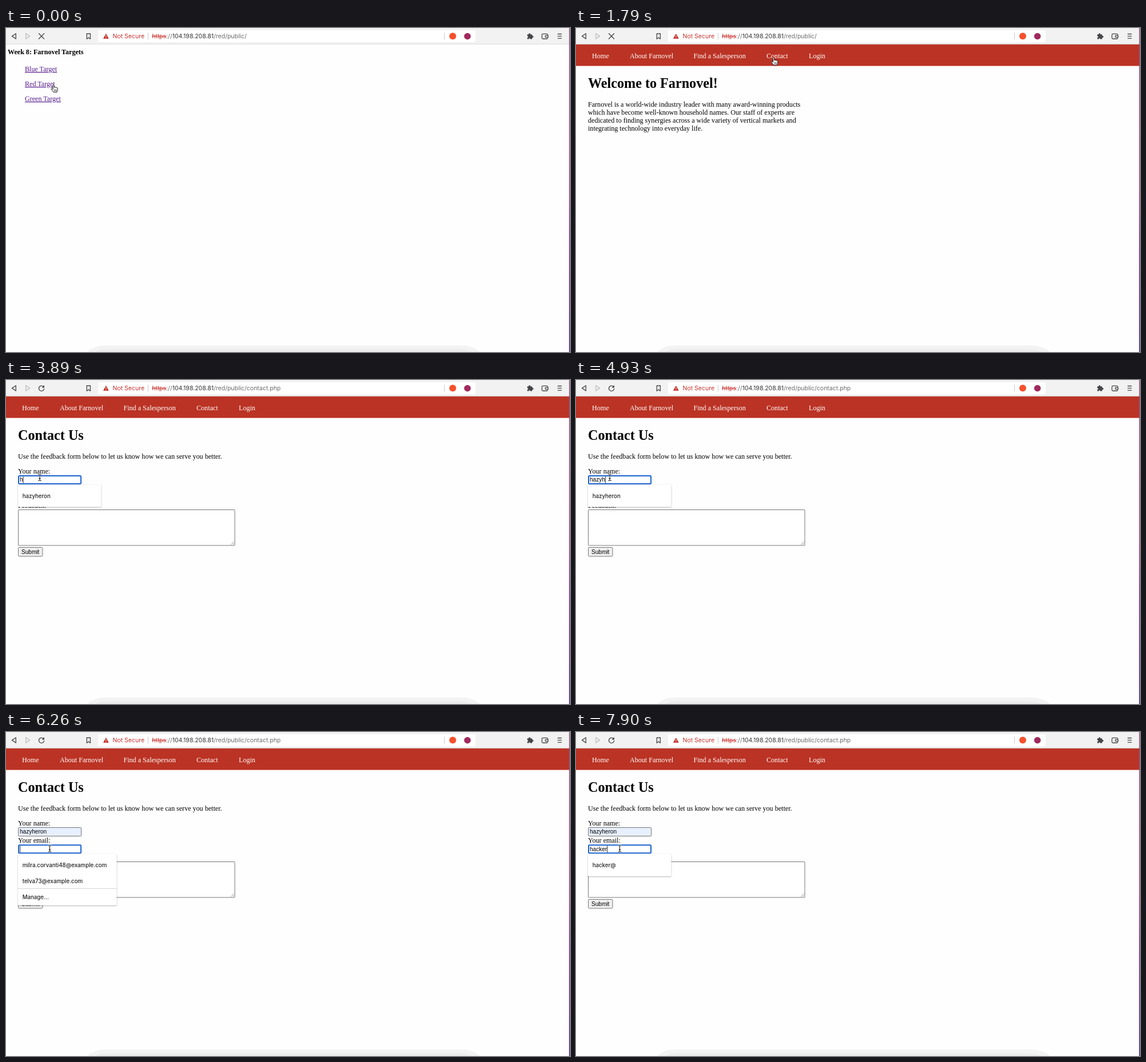
Write an HTML page that moves like this. It is 986 px wide and 568 px high and loops after 8 s.

```html
<!DOCTYPE html>
<html lang="en">
<head>
<meta charset="utf-8">
<title>Contact form</title>
<style>
html, body { margin: 0; width: 100%; height: 100%; overflow: hidden; background: #fefefe; }
svg { display: block; width: 986px; height: 568px; }
.page text { font: 12.08px "Liberation Serif", "Times New Roman", serif; }
.page .head { font-size: 24.16px; font-weight: bold; }
.page .bold { font-weight: bold; }
.page .link { fill: #551a8b; text-decoration: underline; }
.page .ui { font: 10.07px "Liberation Sans", Arial, sans-serif; }
.nav { fill: #fff; }
.bar text { font: 10.5px Inter, Roboto, sans-serif; fill: #6b6b6e; }
.list text { font: 500 9.7px Inter, Roboto, sans-serif; fill: #222; }
.bar .red { fill: #c5302b; }
.bar .host { fill: #333336; }
.icon { fill: none; stroke: #454548; stroke-width: 1.3; stroke-linejoin: round; stroke-linecap: round; }
.box { fill: #fff; stroke: #767676; }
.list { filter: drop-shadow(0 1px 1.2px rgba(0, 0, 0, .3)); }
.pointer path { stroke-linejoin: round; stroke-linecap: round; }
</style>
</head>
<body>
<svg viewBox="0 0 986 568">
  <defs>
    <linearGradient id="edge" x2="0" y2="1">
      <stop stop-color="#8f5a80"/>
      <stop offset=".5" stop-color="#a2477f"/>
      <stop offset=".68" stop-color="#6a2c96"/>
      <stop offset="1" stop-color="#43268f"/>
    </linearGradient>
  </defs>
  <rect width="986" height="568" fill="#fefefe"/>

  <g class="page" id="links">
    <text class="bold" x="3" y="46">Week 8: Farnovel Targets</text>
    <text class="link" x="33" y="76">Blue Target</text>
    <text class="link" x="33" y="102">Red Target</text>
    <text class="link" x="33" y="128">Green Target</text>
  </g>

  <g class="page" id="site">
    <rect y="28.5" width="985" height="38" fill="#bb3324"/>
    <g class="nav">
      <text x="28" y="53">Home</text>
      <text x="94" y="53">About Farnovel</text>
      <text x="205.5" y="53">Find a Salesperson</text>
      <text x="333" y="53">Contact</text>
      <text x="407" y="53">Login</text>
    </g>
    <g id="welcome">
      <text class="head" x="21" y="105">Welcome to Farnovel!</text>
      <text x="21" y="138">Farnovel is a world-wide industry leader with many award-winning products</text>
      <text x="21" y="152">which have become well-known household names. Our staff of experts are</text>
      <text x="21" y="166">dedicated to finding synergies across a wide variety of vertical markets and</text>
      <text x="21" y="180">integrating technology into everyday life.</text>
    </g>
    <g id="contact">
      <text class="head" x="21" y="105">Contact Us</text>
      <text x="21" y="138">Use the feedback form below to let us know how we can serve you better.</text>
      <text x="21" y="164">Your name:</text>
      <text x="21" y="194">Your email:</text>
      <text x="21" y="224">Feedback:</text>
      <g id="name" transform="translate(21 167)"></g>
      <g id="email" transform="translate(21 197.3)"></g>
      <rect class="box" x="21.5" y="227.5" width="378.5" height="62.5" rx=".8"/>
      <path d="M393.5 288.5l5-5M396.5 288.5l2-2" stroke="#777" stroke-width=".8"/>
      <rect x="21.5" y="293.5" width="42.5" height="15.6" rx="1.8" fill="#efefef" stroke="#767676"/>
      <text class="ui" x="27" y="305">Submit</text>
    </g>
  </g>

  <g class="bar">
    <rect width="985" height="28" fill="#f2f2f2"/>
    <path d="M0 28.2H985" stroke="#d4d4d4" stroke-width=".8"/>
    <rect x="161" y="4" width="660" height="21" rx="3" fill="#fff"/>
    <path class="icon" d="M17.3 9.8v9.2l-6.8-4.6z"/>
    <path class="icon" d="M34.7 9.8v9.2l6.8-4.6z" style="stroke:#bdbdbf"/>
    <path class="icon" id="stop" d="M57.4 9.8l9.2 9.2M66.6 9.8l-9.2 9.2"/>
    <g id="reload">
      <path class="icon" d="M65.6 11.8A4.6 4.6 0 1 0 66.6 15.4"/>
      <path d="M67 9v4.6h-4.6z" fill="#454548"/>
    </g>
    <path class="icon" d="M141.2 10h6.2v9.2l-3.1-2.4-3.1 2.4z"/>
    <path d="M174.8 9.8l4.9 9h-9.8z" fill="#c5302b"/>
    <path d="M174.8 13v2.6M174.8 16.6v1" stroke="#fff" stroke-width="1"/>
    <text class="red" x="186.5" y="18.2">Not Secure</text>
    <path d="M248.3 8.5v12M766.5 8.5v12" stroke="#c4c4c6" stroke-width=".9"/>
    <text x="255" y="18.2"><tspan class="red" text-decoration="line-through">https</tspan>://<tspan class="host">104.198.208.81</tspan>/red/public/<tspan id="file"></tspan></text>
    <circle cx="781" cy="14.3" r="6" fill="#f4512c"/>
    <circle cx="806.7" cy="14.5" r="5.8" fill="#a12a5e"/>
    <g fill="#454548">
      <rect x="911.3" y="11.2" width="8.6" height="8.2" rx="1"/>
      <circle cx="915.2" cy="11" r="1.7"/>
      <circle cx="920.4" cy="15.2" r="1.7"/>
      <circle cx="911.5" cy="15.6" r="1.3" fill="#f2f2f2"/>
      <circle cx="915.2" cy="19.4" r="1.3" fill="#f2f2f2"/>
    </g>
    <rect class="icon" x="937" y="10.4" width="10" height="8.6" rx="1.5"/>
    <rect class="icon" x="943" y="13.2" width="4.8" height="3.2" rx=".6" style="fill:#f2f2f2"/>
    <path class="icon" d="M964.7 10.5h6.4M964.7 14.3h6.4M964.7 18.1h6.4"/>
  </g>

  <rect x="133" y="556.5" width="704" height="60" rx="40" fill="#f3f3f3"/>
  <rect x="141" y="563" width="688" height="60" rx="34" fill="#ececec"/>
  <rect x="984.5" y="0" width="1.5" height="568" fill="url(#edge)"/>

  <g class="list" id="list"></g>

  <g class="pointer" id="hand">
    <path d="M-1.2 1c0-1.5 2.3-1.5 2.3 0v3.7c.3-1 2-.9 2.2.2.5-.8 2-.6 2.1.5.6-.6 1.8-.2 1.8.9v2.6c0 1.2-.9 2-1.1 4H-.2c-.4-1.5-2.6-3.2-3.6-4.9-.6-1.2.9-2.2 2-.9l.6.8z" fill="#fff" stroke="#111" stroke-width="1"/>
    <path d="M1.5 8.5v2.4M3.2 8.5v2.4M4.9 8.5v2.4" stroke="#111" stroke-width=".7"/>
  </g>
  <path class="pointer" id="arrow" d="M0 0v11.5l2.7-2.5 1.8 4 1.9-.8-1.8-4h3.6z" fill="#111" stroke="#fff" stroke-width=".8"/>
  <g class="pointer" id="beam" fill="none">
    <path d="M-2.4-5.6q2.4 0 2.4 1.6q0-1.6 2.4-1.6M0-4.5v9M-2.4 5.6q2.4 0 2.4-1.6q0 1.6 2.4 1.6M-1.4 1.5h2.8" stroke="#fff" stroke-width="2"/>
    <path d="M-2.4-5.6q2.4 0 2.4 1.6q0-1.6 2.4-1.6M0-4.5v9M-2.4 5.6q2.4 0 2.4-1.6q0 1.6 2.4 1.6M-1.4 1.5h2.8" stroke="#111" stroke-width="1"/>
  </g>
</svg>
<script>
const LOOP = 8000;
const USER = 'hazyheron';
const MAILS = ['milra.corvanti48@example.com', 'telva73@example.com'];
const $ = id => document.getElementById(id);
const show = (id, on) => { $(id).style.display = on ? '' : 'none'; };
const at = (cursor, x, y) => ({ cursor, x, y });

// Each step changes only the listed parts of the state.
const steps = [
  [0, { page: 'links', loading: true, name: '', email: '', focus: '', hover: '', filled: false,
        caret: false, items: [], manage: false, lit: false, ...at('hand', 83, 99.5) }],
  [150, { page: 'welcome', loading: false }],
  [900, at('beam', 112, 101)],
  [1050, at('arrow', 205, 82)],
  [1190, at('hand', 322, 46)],
  [1340, at('hand', 345.5, 52)],
  [1790, { loading: true }],
  [1940, { page: 'contact', loading: false }],
  [2240, at('arrow', 290, 80)],
  [2390, at('beam', 130, 138)],
  [2540, { hover: 'name', ...at('beam', 59, 171) }],
  [2840, { focus: 'name', caret: true, items: [USER, 'admin', 'test'] }],
  [3290, { caret: false }],
  [3890, { caret: true, name: USER.slice(0, 1), items: [USER] }],
  [4030, { name: USER.slice(0, 2) }],
  [4330, { name: USER.slice(0, 3) }],
  [4630, { name: USER.slice(0, 4) }],
  [4930, { name: USER.slice(0, 5) }],
  [5220, { name: USER.slice(0, 6) }],
  [5370, at('beam', 64, 168)],
  [5520, { name: USER, filled: true, caret: false, lit: true, hover: '', ...at('beam', 83, 199) }],
  [5670, at('beam', 85, 204.7)],
  [5820, { items: [], lit: false, caret: true, hover: 'email' }],
  [5960, at('beam', 76.5, 204.7)],
  [6260, { focus: 'email', items: MAILS, manage: true }],
  [6710, { caret: false }],
  [6850, { caret: true, email: 'h', items: ['hacker@', 'hack@'], manage: false }],
  [7000, { email: 'ha' }],
  [7300, { email: 'hac' }],
  [7600, { email: 'hack' }],
  [7750, { email: 'hacke', items: ['hacker@'] }],
  [7900, { email: 'hacker' }]
];

function drawField(id, s) {
  const focused = s.focus === id;
  const fill = id === 'name' && s.filled ? '#e8f0fe' : '#fff';
  const line = focused ? '#1a62d0' : s.hover === id ? '#333' : '#767676';
  const w = focused ? 2 : 1;
  $(id).innerHTML = `<rect x="${w / 2}" y="${w / 2}" width="${111 - w}" height="${16 - w}" rx="1.3"
    fill="${fill}" stroke="${line}" stroke-width="${w}"/><text class="ui" x="3" y="11.3">${s[id]}</text>`;
  if (!focused || !s.caret) return;
  const x = 3.5 + $(id).querySelector('text').getComputedTextLength();
  $(id).innerHTML += `<path d="M${x} 2.2v11.6" stroke="#111" stroke-width=".9"/>`;
}

function drawList({ items, manage, lit, focus }) {
  const top = focus === 'name' ? 183.5 : 213.8;
  const width = manage ? 172.5 : 145.5;
  const height = manage ? 90 : 12 + 27 * items.length;
  const label = (text, y) => `<text x="28.7" y="${y}">${text}</text>`;
  let out = '';
  if (items.length) {
    out = `<rect x="21" y="${top}" width="${width}" height="${height}" rx="1" fill="#fff"/>`;
    if (lit) out += `<rect x="21" y="${top + 6}" width="${width}" height="27.3" fill="#e8e8e8"/>`;
    out += items.map((text, i) => label(text, top + 23.4 + 27.3 * i)).join('');
  }
  if (manage) out += `<path d="M21 274.5h${width}" stroke="#d5d5d5"/>` + label('Manage...', 293);
  $('list').innerHTML = out;
}

function draw(s) {
  show('links', s.page === 'links');
  show('site', s.page !== 'links');
  show('welcome', s.page === 'welcome');
  show('contact', s.page === 'contact');
  show('stop', s.loading);
  show('reload', !s.loading);
  $('file').textContent = s.page === 'contact' ? 'contact.php' : '';
  drawField('name', s);
  drawField('email', s);
  drawList(s);
  for (const id of ['hand', 'arrow', 'beam']) show(id, id === s.cursor);
  $(s.cursor).setAttribute('transform', `translate(${s.x} ${s.y})`);
}

let shown = 0;
function frame() {
  const t = performance.now() % LOOP;
  const past = steps.filter(([time]) => time <= t);
  if (past.length !== shown) {
    shown = past.length;
    draw(Object.assign({}, ...past.map(step => step[1])));
  }
  requestAnimationFrame(frame);
}
frame();
</script>
</body>
</html>
```
